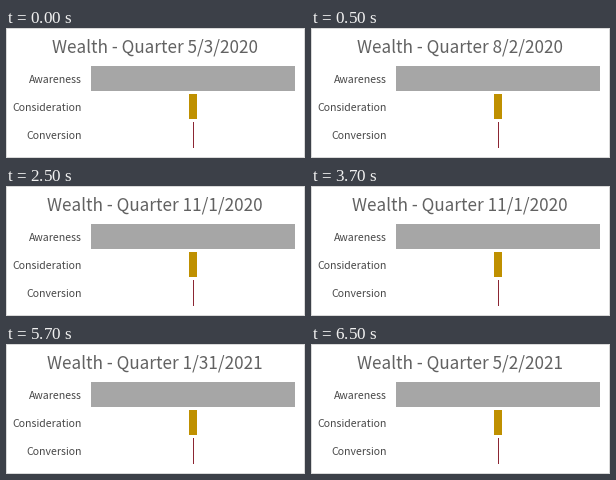
A matplotlib script that plays this animation: 299x130 px, repeating every 8000 ms.

```python
import matplotlib.pyplot as plt
from matplotlib.animation import FuncAnimation
from matplotlib.patches import Rectangle

WIDTH, HEIGHT, DPI = 299, 130, 64
STEP_MS, STEPS = 500, 16
FONT = "Noto Sans CJK JP"

QUARTERS = ["5/3/2020", "8/2/2020", "11/1/2020", "1/31/2021", "5/2/2021"]

# label, baseline, then bar left, top, width, height and colour
STAGES = [
    ("Awareness", 55, 85, 38, 204, 25, "#a6a6a6"),
    ("Consideration", 83, 183, 66, 8, 25, "#bf9000"),
    ("Conversion", 111, 187, 94, 1, 26, "#8c2633"),
]

plt.rcParams["toolbar"] = "None"
fig = plt.figure(figsize=(WIDTH / DPI, HEIGHT / DPI), dpi=DPI, facecolor="white")
ax = fig.add_axes([0, 0, 1, 1])
ax.set(xlim=(0, WIDTH), ylim=(HEIGHT, 0))
ax.axis("off")


def add_box(x, y, w, h, color):
    ax.add_patch(Rectangle((x, y), w, h, facecolor=color, linewidth=0, antialiased=False))


def add_text(x, y, text, pixels, color, align):
    return ax.text(x, y, text, family=FONT, fontsize=pixels * 72 / DPI,
                   color=color, ha=align, va="baseline")


add_box(0, 0, WIDTH, HEIGHT, "#d9d9d9")
add_box(1, 1, WIDTH - 2, HEIGHT - 2, "white")
for label, baseline, *bar in STAGES:
    add_box(*bar)
    add_text(76, baseline, label, 10.5, "#484848", "right")
title = add_text(149, 25, "", 17.1, "#626262", "center")


def update(step):
    # A new quarter every four steps, the first change after one step
    quarter = QUARTERS[(step + 3) // 4]
    title.set_text(f"Wealth - Quarter {quarter}")
    return [title]


anim = FuncAnimation(fig, update, frames=STEPS, interval=STEP_MS,
                     repeat=True, repeat_delay=0)
plt.show()
```
